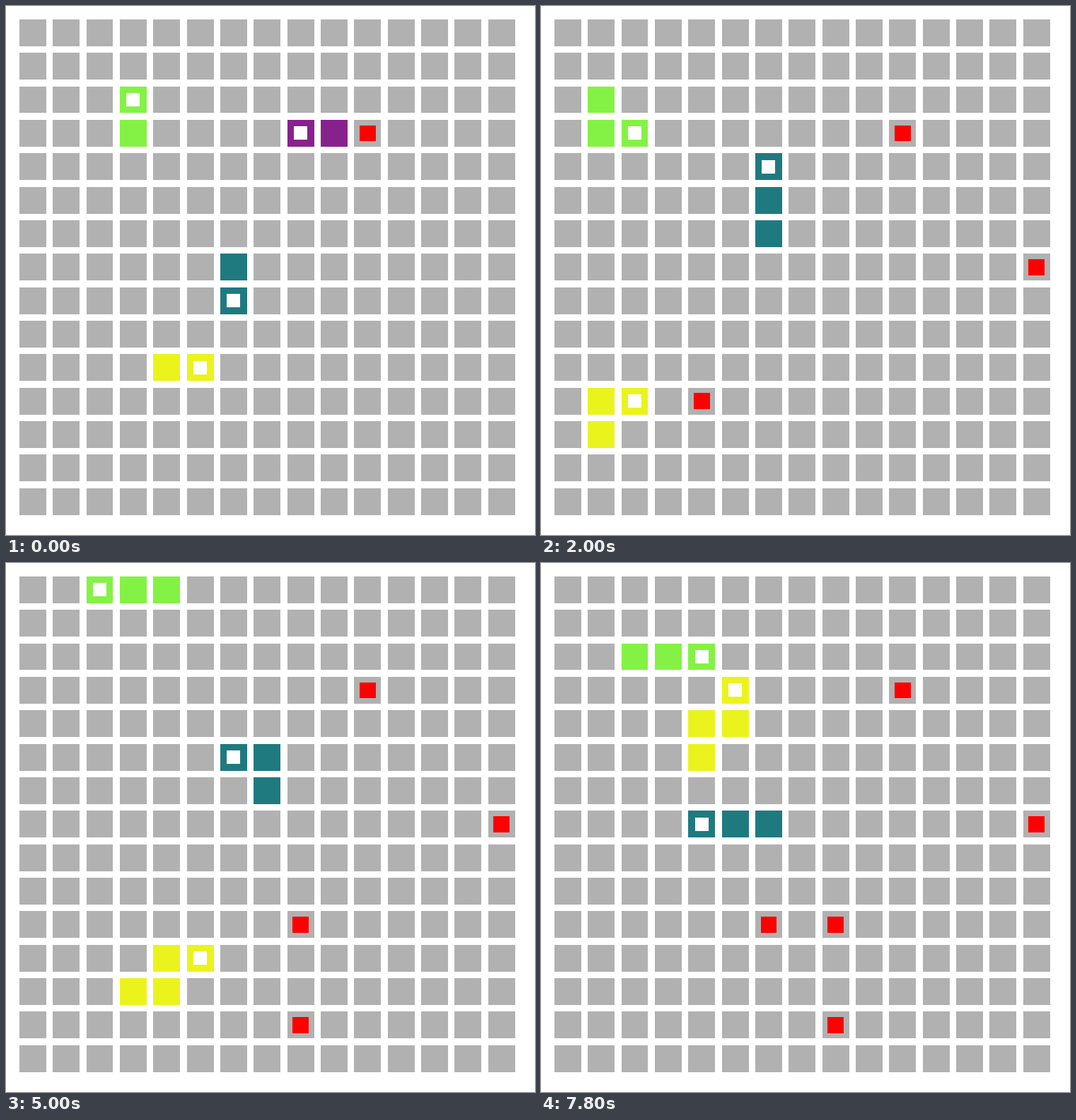
An HTML page with a canvas for the animation above (8000 ms loop, 748x748 px).

```html
<!DOCTYPE html>
<html lang="en">
<head>
<meta charset="utf-8">
<title>Snakes on a grid</title>
<style>
html, body { margin: 0; width: 100%; height: 100%; overflow: hidden; background: #fff; }
canvas { display: block; }
</style>
</head>
<body>
<canvas id="stage" width="748" height="748"></canvas>
<script>
const ctx = document.getElementById('stage').getContext('2d');
const GRID = 15, STEP_MS = 200, STEPS = 40;
const PITCH = 748 / (GRID + 0.8);
const CELL = 0.8 * PITCH;
const DIRS = { U: [0, -1], D: [0, 1], L: [-1, 0], R: [1, 0] };

// Each path begins at the tail cell; its first move leads to the opening head.
const snakes = [
  { color: '#84f244', start: [3, 3],
    moves: 'U RULLLL DRDRDD LUR RRURUL UULLDRR RULLL LDDRRR' },
  { color: '#87228c', start: [9, 3], dies: 9,
    moves: 'L LDDRDD LL' },
  { color: '#1f7a80', start: [6, 7],
    moves: 'D LLULUR RRUULL URU RDRDDR DLULUUU RDDDR DLDLLL' },
  { color: '#ebf31d', start: [4, 10], grows: 16,
    moves: 'R ULDLLD DLURDL URR RULLDD RRURRUU UULLL URUURU' }
];

const foods = [
  { at: [10, 3], from: 0 },
  { at: [14, 7], from: 1 },
  { at: [4, 11], from: 9, until: 16 },
  { at: [8, 13], from: 17 },
  { at: [8, 10], from: 25 },
  { at: [6, 10], from: 33 }
];

for (const snake of snakes) {
  snake.path = [snake.start];
  for (const move of snake.moves.replace(/ /g, '')) {
    const [x, y] = snake.path[snake.path.length - 1];
    const [dx, dy] = DIRS[move];
    snake.path.push([x + dx, y + dy]);
  }
}

// Square centred in a grid cell, with edges on whole pixels.
function square([col, row], scale, color) {
  const half = CELL * scale / 2;
  const cx = PITCH * (col + 0.8), cy = PITCH * (row + 0.8);
  const x = Math.round(cx - half), y = Math.round(cy - half);
  ctx.fillStyle = color;
  ctx.fillRect(x, y, Math.round(cx + half) - x, Math.round(cy + half) - y);
}

function drawSnake(snake, step) {
  if (step >= (snake.dies ?? Infinity)) return;
  const length = step >= (snake.grows ?? Infinity) ? 4 : 3;
  const head = step + 1;
  const body = snake.path.slice(Math.max(0, head - length + 1), head + 1);
  body.forEach(cell => square(cell, 1, snake.color));
  square(snake.path[head], 0.5, '#fff');
}

function draw(step) {
  ctx.fillStyle = '#fff';
  ctx.fillRect(0, 0, 748, 748);
  for (let row = 0; row < GRID; row++) {
    for (let col = 0; col < GRID; col++) square([col, row], 1, '#b1b1b1');
  }
  for (const food of foods) {
    if (step >= food.from && step < (food.until ?? Infinity)) square(food.at, 0.6, '#f00');
  }
  snakes.forEach(snake => drawSnake(snake, step));
}

const begin = performance.now();
function tick() {
  const elapsed = performance.now() - begin;
  draw(Math.floor(elapsed / STEP_MS) % STEPS);
  requestAnimationFrame(tick);
}
tick();
</script>
</body>
</html>
```
